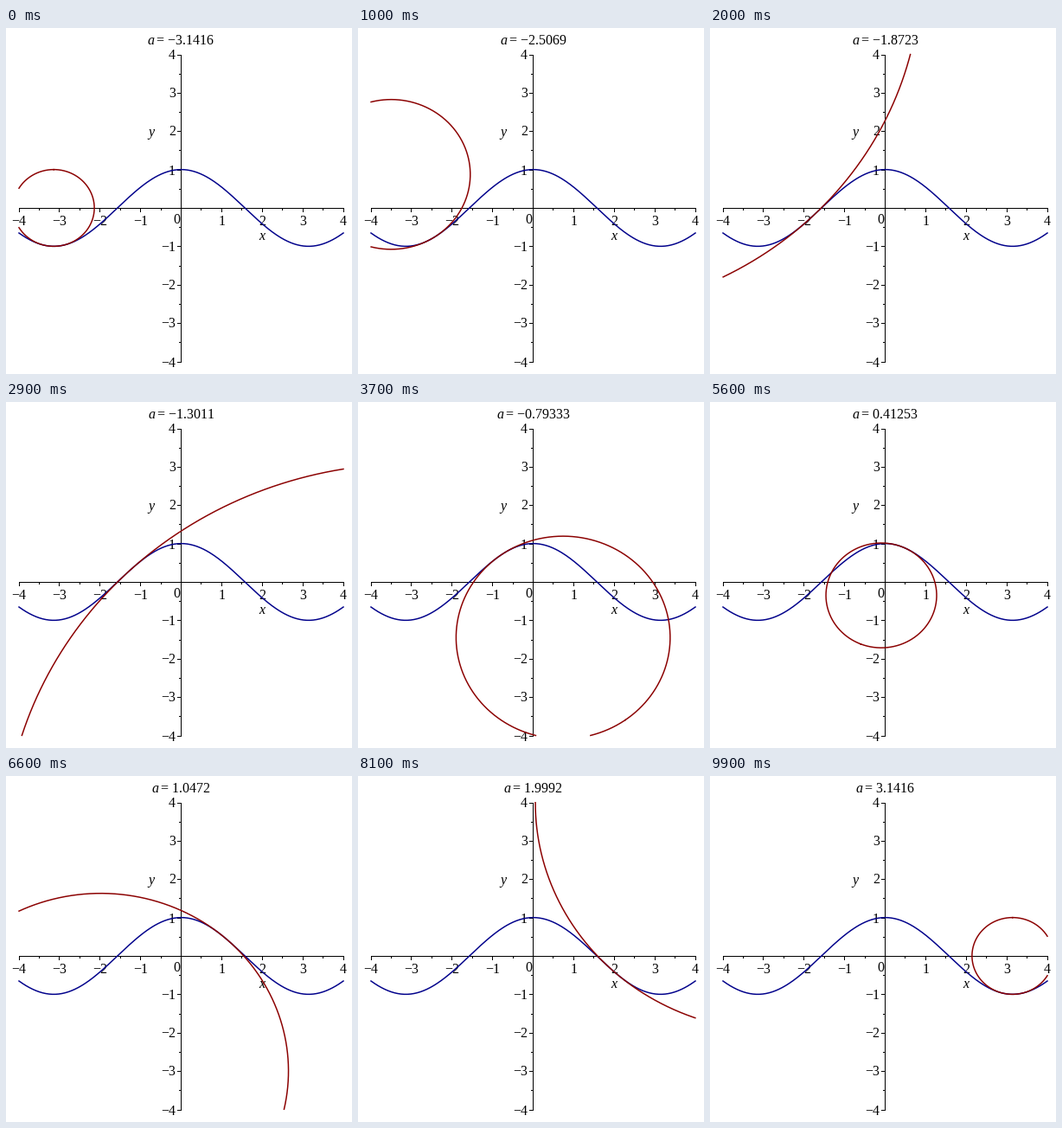
Recreate the animation shown at these times as a matplotlib script. Size 400 px wide and 400 px high, loop 10000 ms.

```python
import numpy as np
import matplotlib.pyplot as plt
from matplotlib.animation import FuncAnimation

SIZE, DPI, FRAMES = 400, 100, 100
PX = 72 / DPI                       # points per pixel
FONT = 16 * PX
BLUE, RED = "#00008b", "#8b0000"

plt.rcParams.update({
    "font.family": "Liberation Serif",
    "mathtext.fontset": "custom",
    "mathtext.rm": "Liberation Serif",
    "mathtext.it": "Liberation Serif:italic",
})

fig = plt.figure(figsize=(SIZE / DPI, SIZE / DPI), dpi=DPI, facecolor="white")
ax = fig.add_axes([0, 0, 1, 1])
ax.set(xlim=(0, SIZE), ylim=(SIZE, 0))
ax.axis("off")


def px(x):
    return 202.5 + 46.875 * x


def py(y):
    return 208 - 44.375 * y


def rule(xs, ys):
    ax.plot(xs, ys, color="black", lw=PX, solid_capstyle="butt",
            snap=False, zorder=1)


def label(x, y, text, ha="center", **kw):
    return ax.text(x, y, text, fontsize=FONT, ha=ha, va="baseline", zorder=2, **kw)


def draw_axes():
    rule([15, 391], [208.5] * 2)
    rule([202.5] * 2, [31, 387])
    for half in range(-8, 9):
        v = half / 2
        size = 3 if half % 2 else 5
        # ticks sit on whole pixels
        x = np.floor(px(v)) + 0.5
        y = np.floor(py(v) + 0.5) + 0.5
        rule([x, x], [208, 208 + size])
        rule([203 - size, 203], [y, y])
        if half % 2 == 0 and half:
            text = f"{half // 2}".replace("-", "\u2212")
            label(px(v), 228, text)
            label(196, y + 5, text, ha="right")
    label(197, 226.5, "0")
    label(296, 245, "x", style="italic")
    label(167.5, 125, "y", style="italic")


def circle(a):
    """Osculating circle of cos x at x = a, kept inside the view."""
    d1, d2 = -np.sin(a), -np.cos(a)
    q = (1 + d1 * d1) / d2
    cx, cy = a - d1 * q, np.cos(a) + q
    r = np.hypot(a - cx, np.cos(a) - cy)
    span = min(np.pi, 14 / r)
    t = np.arctan2(np.cos(a) - cy, a - cx) + np.linspace(-span, span, 4001)
    x, y = cx + r * np.cos(t), cy + r * np.sin(t)
    inside = (abs(x) <= 4) & (abs(y) <= 4)
    return px(np.where(inside, x, np.nan)), py(np.where(inside, y, np.nan))


draw_axes()
xs = np.linspace(-4, 4, 400)
ax.plot(px(xs), py(np.cos(xs)), color=BLUE, lw=1.5 * PX, zorder=3)
curve, = ax.plot([], [], color=RED, lw=1.5 * PX, zorder=4)
title = label(202.5, 19, "")


def update(i):
    a = -np.pi + 2 * np.pi * i / (FRAMES - 1)
    curve.set_data(*circle(a))
    value = f"{a:#.5g}".replace("-", "{-}")
    title.set_text(rf"$a=\,{value}$")
    return curve, title


anim = FuncAnimation(fig, update, frames=FRAMES, interval=100,
                     repeat=True, repeat_delay=0, blit=False)
plt.show()
```
